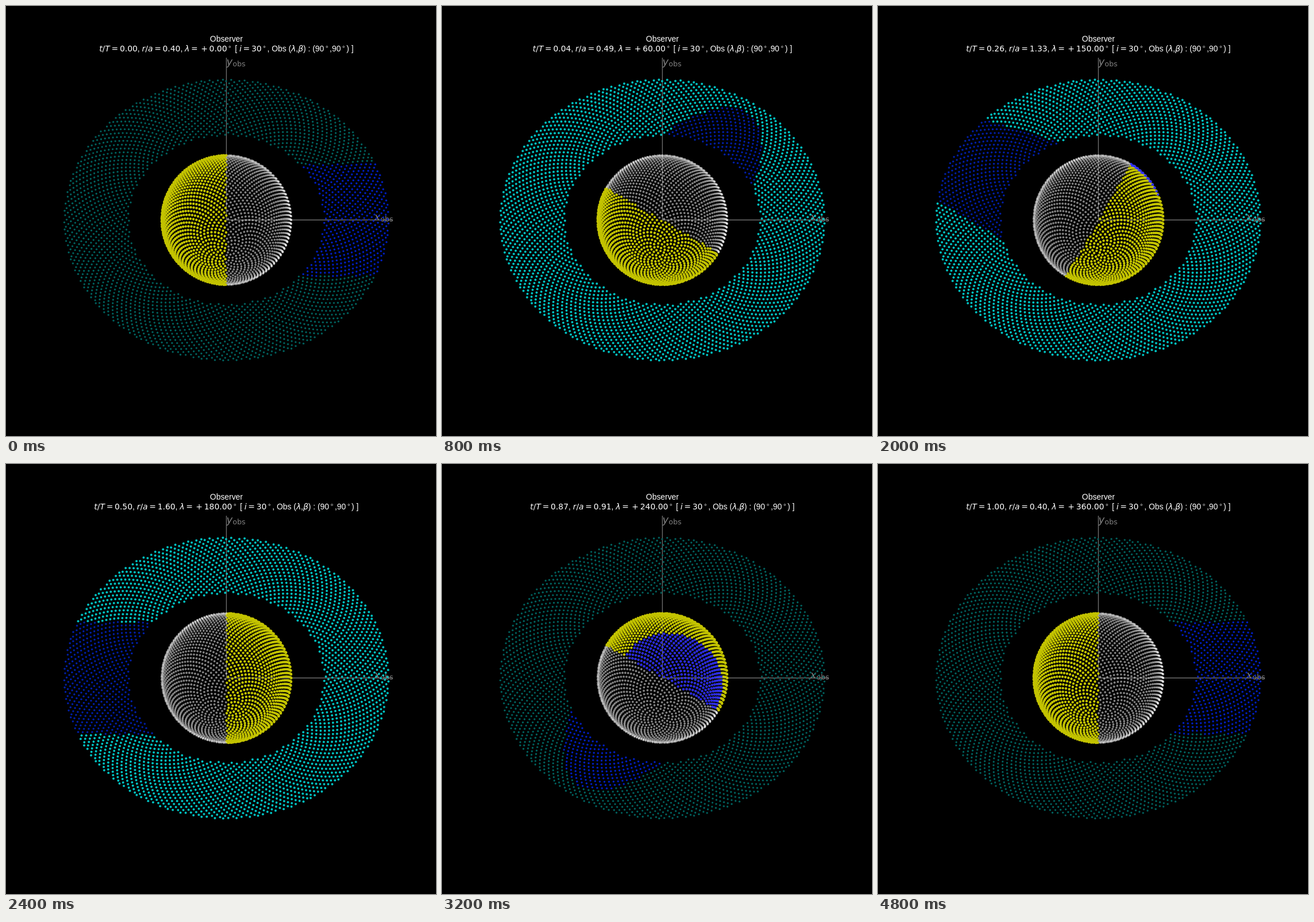
These frames come from a looping animation (748 px wide and 748 px high, 5000 ms). An HTML page with a canvas:

```html
<!DOCTYPE html>
<html>
<head>
<meta charset="utf-8">
<style>
html, body { margin: 0; width: 100%; height: 100%; overflow: hidden; background: #000; }
canvas { display: block; }
</style>
</head>
<body>
<canvas id="stage" width="748" height="748"></canvas>
<script>
const ctx = document.getElementById('stage').getContext('2d');
const CX = 383.4, CY = 372.3, R = 112.8;
const DEG = Math.PI / 180, GOLDEN = Math.PI * (3 - Math.sqrt(5));
const TILT = 30 * DEG, ECC = 0.6, INNER = 1.5, OUTER = 2.5;
const SPHERE_COUNT = 4000, RING_COUNT = 3000;
const SIZE = 13.89;
const SANS = 'Arial, "Liberation Sans", sans-serif', MATH = '"DejaVu Sans", sans-serif';
const NORMAL = [0, -Math.sin(TILT), Math.cos(TILT)];

const dot = (a, b) => a[0] * b[0] + a[1] * b[1] + a[2] * b[2];

// Equatorial coordinates to the observer's frame
const tilt = (x, y, z) => [
  x,
  y * Math.cos(TILT) - z * Math.sin(TILT),
  y * Math.sin(TILT) + z * Math.cos(TILT)
];

function makeSphere() {
  const pts = [];
  for (let i = 0; i < SPHERE_COUNT; i++) {
    const z = 1 - (2 * i + 1) / SPHERE_COUNT, r = Math.sqrt(1 - z * z), a = i * GOLDEN;
    const p = tilt(r * Math.cos(a), r * Math.sin(a), z);
    if (p[2] > 0) pts.push(p);
  }
  return pts;
}

// Sunflower disk with a smooth rim and the middle left out
function makeRing() {
  const pts = [], total = Math.round(RING_COUNT / (1 - (INNER / OUTER) ** 2));
  const rim = Math.round(2 * Math.sqrt(total));
  for (let k = 1; k <= total; k++) {
    const r = OUTER * Math.min(1, Math.sqrt((k - 0.5) / (total - (rim + 1) / 2)));
    const a = k * GOLDEN;
    if (r >= INNER) pts.push(tilt(r * Math.cos(a), r * Math.sin(a), 0));
  }
  return pts;
}

const sphere = makeSphere(), ring = makeRing();

function spot(p, radius, color) {
  ctx.fillStyle = color;
  ctx.beginPath();
  ctx.arc(CX + R * p[0], CY - R * p[1], radius, 0, 7);
  ctx.fill();
}

function inRingShadow(p, sun) {
  const t = -dot(p, NORMAL) / dot(sun, NORMAL);
  const d = Math.hypot(...p.map((v, i) => v + t * sun[i]));
  return t > 0 && d > INNER && d < OUTER;
}

function inPlanetShadow(p, sun) {
  const along = dot(p, sun);
  return along < 0 && dot(p, p) - along * along < 1;
}

function drawRing(sun) {
  const lit = dot(sun, NORMAL) > 0;
  for (const p of ring) {
    if (inPlanetShadow(p, sun)) spot(p, 1.75, lit ? 'rgb(0,30,165)' : 'rgb(0,30,190)');
    else if (lit) spot(p, 2, '#00bfbf');
    else spot(p, 1.7, 'rgb(0,95,92)');
  }
}

function drawPlanet(sun) {
  for (const p of sphere) {
    if (dot(p, sun) <= 1e-9) {
      spot(p, 1.9, 'rgba(255,255,255,.5)');
    } else if (inRingShadow(p, sun)) {
      spot(p, 2.1, 'rgba(255,255,255,.5)');
      spot(p, 2.1, 'rgba(15,15,255,.8)');
    } else {
      spot(p, 2.2, 'rgb(195,195,0)');
    }
  }
}

function axisLabel(letter, x, y) {
  ctx.fillStyle = '#808080';
  ctx.font = `italic 18px ${MATH}`;
  ctx.fillText(letter, x, y);
  ctx.font = `12.6px ${MATH}`;
  ctx.fillText('obs', x + 10.7, y + 2);
}

function drawAxes() {
  ctx.strokeStyle = '#6c6c6c';
  ctx.lineWidth = 1.4;
  ctx.beginPath();
  ctx.moveTo(CX, 90);
  ctx.lineTo(CX, CY);
  ctx.lineTo(673, CY);
  ctx.stroke();
  axisLabel('x', 640.5, 373);
  axisLabel('y', 383.6, 103.3);
}

// Text runs: [text, font, left pad, right pad, rise]
const plain = s => [s, `${SIZE}px ${SANS}`, 0, 0, 0];
const ital = s => [s, `italic ${SIZE}px ${MATH}`, 0, 0, 0];
const math = s => [s, `${SIZE}px ${MATH}`, 0, 0, 0];
const op = s => [s, `${SIZE}px ${MATH}`, 2.75, 2.75, 0];
const deg = () => ['\u2218', `${SIZE * 0.7}px ${MATH}`, 1.9, 1.9, 5.3];

function drawRuns(runs, center, y) {
  const widths = runs.map(([s, font, l, r]) => {
    ctx.font = font;
    return l + ctx.measureText(s).width + r;
  });
  let x = center - widths.reduce((a, b) => a + b) / 2;
  runs.forEach(([s, font, l, r, rise], i) => {
    ctx.font = font;
    ctx.fillText(s, x + l, y - rise);
    x += widths[i];
  });
}

function orbitPhase(angle) {
  let E = 2 * Math.atan(Math.sqrt((1 - ECC) / (1 + ECC)) * Math.tan(angle / 2));
  if (angle > Math.PI) E += 2 * Math.PI;
  return (E - ECC * Math.sin(E)) / (2 * Math.PI);
}

function drawTitle(lon) {
  const time = orbitPhase(lon * DEG).toFixed(2);
  const dist = ((1 - ECC * ECC) / (1 + ECC * Math.cos(lon * DEG))).toFixed(2);
  ctx.fillStyle = '#fff';
  drawRuns([plain('Observer')], CX, 62);
  drawRuns([
    ital('t'), math('/'), ital('T'), op('='), math(time), plain(', '),
    ital('r'), math('/'), ital('a'), op('='), math(dist), plain(', '),
    ital('λ'), op('='), op('+'), math(lon.toFixed(2)), deg(), plain(' [ '),
    ital('i'), op('='), math('30'), deg(), plain(', Obs ('),
    ital('λ'), plain(','), ital('β'), plain(') : (90'), deg(),
    plain(',90'), deg(), plain(') ]')
  ], CX, 79.3);
}

function draw(now) {
  const lon = 15 * (Math.floor(now / 200) % 25);
  const sun = [-Math.cos(lon * DEG), -Math.sin(lon * DEG), 0];
  ctx.fillStyle = '#000';
  ctx.fillRect(0, 0, 748, 748);
  drawAxes();
  drawRing(sun);
  drawPlanet(sun);
  drawTitle(lon);
}

const start = performance.now();
function tick() {
  draw(performance.now() - start);
  requestAnimationFrame(tick);
}
tick();
</script>
</body>
</html>
```
